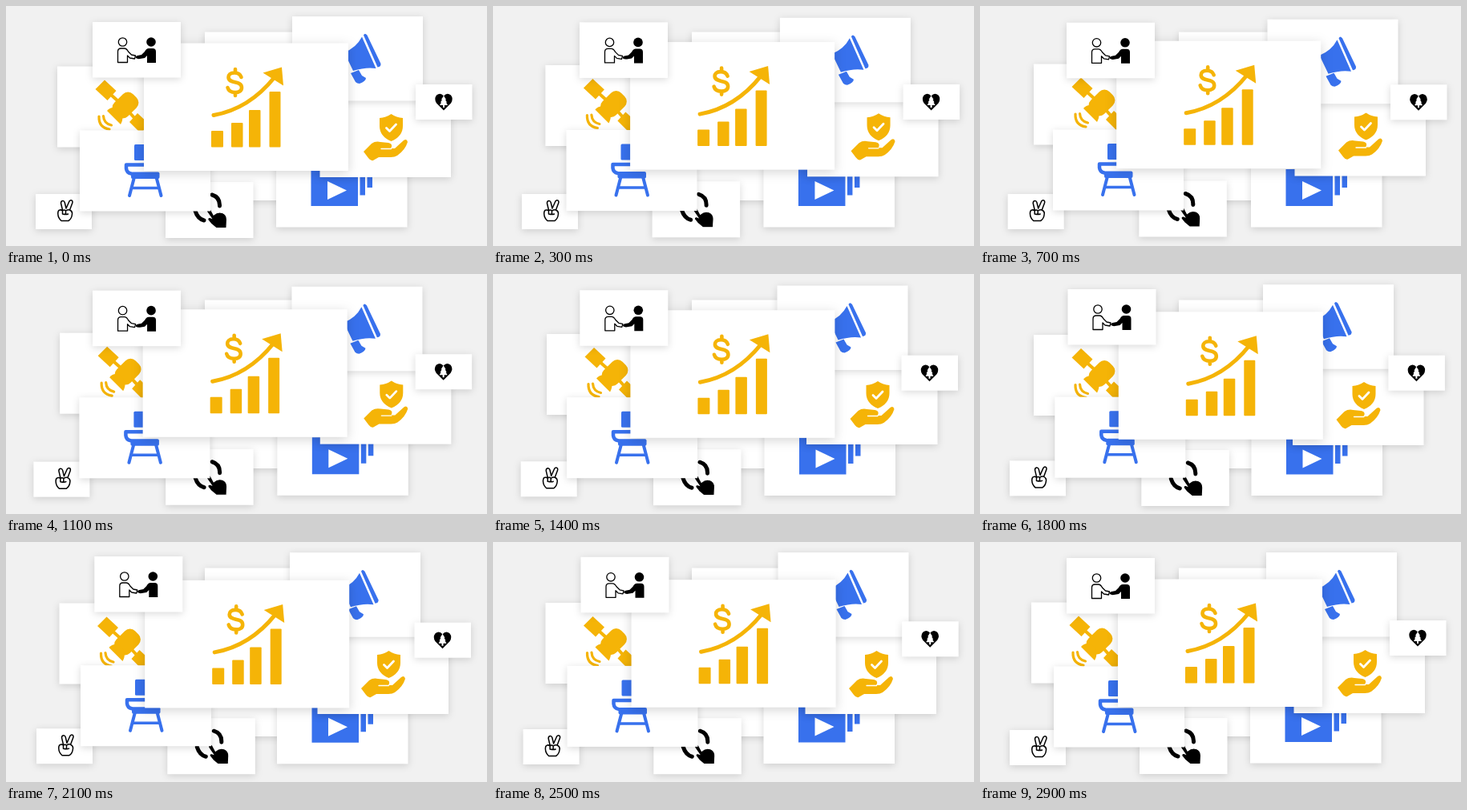
Animation, 600 px wide and 300 px high, one loop 3000 ms. Source, as an HTML page:

```html
<!DOCTYPE html>
<html lang="en">
<head>
<meta charset="utf-8">
<title>Floating cards</title>
<style>
  html, body { margin: 0; width: 100%; height: 100%; overflow: hidden; background: #f1f1f1; }
  svg { display: block; width: 100vw; height: 100vh; }
  .card { fill: #fff; filter: drop-shadow(0 2px 5px rgba(0, 0, 0, .15)); }
  .big { filter: drop-shadow(0 3px 7px rgba(0, 0, 0, .17)); }
  .gold { fill: #f5b407; }
  .blue { fill: #3871ed; }
  .line { fill: none; stroke-linecap: round; stroke-linejoin: round; }
  .gold.line { fill: none; stroke: #f5b407; }
  .blue.line { fill: none; stroke: #3871ed; }
  .ink.line { stroke: #000; }
  .white { fill: #fff; }
  .white.line { fill: none; stroke: #fff; }
</style>
</head>
<body>
<svg viewBox="0 0 600 300" xmlns="http://www.w3.org/2000/svg">
  <rect class="card" x="248" y="32.5" width="150" height="210.5"/>

  <g id="video">
    <rect class="card" x="337" y="171" width="163.5" height="105.5"/>
    <path class="blue" d="M380.5 204h58.5v46h-58.5zM441.500 204h6.500v32.500h-6.500zM450.500 204h6.500v23h-6.500z"/>
    <path class="white" d="M401 219L425 230.500L401 242z"/>
  </g>

  <g id="shield">
    <rect class="card" x="391.500" y="109" width="163.500" height="105"/>
    <path class="gold" d="M480.500 135Q487 139.500 495 140V150Q495 163 480.500 169Q466 163 466 150V140Q474 139.500 480.500 135z"/>
    <path class="white line" stroke-width="2.800" d="M474.500 152.500L478.500 156.500L486.500 148"/>
    <path class="gold" d="M446 182L456 172Q461 168.500 467 170L477 171Q482 172 481 176L480 178L485 178L496 168Q500 165 501 170Q498 180 488 187Q485 189 480 189H465L458 193Q455 194 452 190z"/>
    <path class="white line" stroke-width="1.300" d="M468 178.500H480.500"/>
  </g>

  <g id="satellite">
    <rect class="card" x="64" y="75.500" width="163" height="101"/>
    <path class="gold" d="M123 92.500L137.500 106L126.500 118L111.500 104zM164 134L179 148L168 159L154 145z"/>
    <path class="gold line" stroke-width="4" d="M131 111L141 120M154 133L162 142"/>
    <rect class="gold" x="132.500" y="112" width="33" height="24" rx="9" transform="rotate(-45 149 124)"/>
    <path class="gold" d="M126 131Q132 124 140 129Q149 137 143 148z"/>
    <path class="gold line" stroke-width="3.200" d="M121.500 137.500Q122 147 131.500 149M116 138Q115.500 152 129 154"/>
  </g>

  <g id="touch">
    <rect class="card" x="199" y="220" width="109.500" height="70"/>
    <path class="ink line" stroke-width="5" d="M257 236Q267 239 266.500 250M236 256Q239 266 247 268"/>
    <path stroke="#fff" stroke-width="1.200" d="M250.500 257Q249.500 253 252.500 252.500Q254.500 252.500 255.500 254.500L259 261Q264 256.500 270 258.500Q276 261 275.500 268L275 277.500H262L256 272.500L252 267.500Q251 264 254.500 264.500L256 265z"/>
  </g>

  <g id="peace">
    <rect class="card" x="37" y="235" width="70" height="44"/>
    <path class="ink line" stroke-width="1.500" d="M70.500 255L68.500 246.500Q68.500 243.500 71 243.500Q72.500 243.500 73.200 245.500L75 253L79 244Q80.500 242 82.300 243.200Q83.500 244.500 82.700 246.500L79.500 255Q83 256.500 82.500 260Q82 266 78 268.500H69Q65 265 64.800 260Q64.500 255.500 67 255Q69 254.500 70.500 256V260M70.500 256q2-2 4 0v4M74.500 256q3-2 5-1M70.500 260q5 1 7 0"/>
  </g>

  <g id="chair">
    <rect class="card" x="92" y="155.500" width="163" height="101"/>
    <rect class="blue" x="160" y="173" width="28" height="20" rx="1.500"/>
    <path class="blue line" stroke-width="4.500" d="M172 198.500H150V203Q150.500 208.500 156 209.500"/>
    <rect class="blue" x="156" y="207.500" width="35.500" height="8.500" rx="2"/>
    <path class="blue line" stroke-width="4" d="M160 214L154 237M187.500 214L193.500 237"/>
    <path class="blue line" stroke-width="3.500" d="M158 227.500H190"/>
  </g>

  <g id="horn">
    <rect class="card" x="357" y="13" width="163" height="105.500"/>
    <path class="blue" d="M446 36.500Q447.500 33 450.500 36.500L467.500 72Q468 76 463.500 76.500z"/>
    <path class="blue" d="M444 38.500L461.500 78Q449 76 433 81L422 58Q437 52 444 38.500z"/>
    <path class="blue" d="M430 84L440 80L444 87L449 90Q449 94 441 97Q438 97 436 95z"/>
  </g>

  <g id="heart">
    <rect class="card" x="511" y="98" width="70.500" height="44"/>
    <path d="M546 130.500L537 121.500Q533.500 116 537 111.500Q542 107.500 546 112.500Q550 107.500 555 111.500Q558.500 116 555 121.500z"/>
    <path class="white" d="M546 112L549 117H548L550 120.500H549L551 124H547V127H545V124H541L543 120.500H542L544 117H543z"/>
  </g>

  <g id="chart">
    <rect class="card big" x="172" y="46.500" width="255" height="159.500"/>
    <rect class="gold" x="256" y="156" width="15" height="20.500" rx="1"/>
    <rect class="gold" x="281" y="146" width="14.500" height="30.500" rx="1"/>
    <rect class="gold" x="303" y="130" width="14.500" height="46.500" rx="1"/>
    <rect class="gold" x="328.500" y="107" width="14" height="69.500" rx="1"/>
    <path class="gold line" stroke-width="5" d="M259 136.500C290 131 315 114 335 89"/>
    <path class="gold" d="M344 76.500L346 99.500L320.500 83.500z"/>
    <path class="gold line" stroke-width="4.600" d="M293.500 89C292 84.500 288.500 83.500 285 83.500C279.500 83.500 277.500 86.500 277.500 89C277.500 98 294 92.500 294 102C294 106 290.500 108 286 108C281 108 277.500 106 276.500 102M286 79V83M286 108V112"/>
  </g>

  <g id="deal">
    <rect class="card" x="108" y="20" width="110" height="69.500"/>
    <circle class="ink line" cx="145.500" cy="45" r="5.200" stroke-width="1.300"/>
    <path class="ink line" stroke-width="1.300" d="M139.500 70.500v-13.500q0-4 4-4h4q3 0 5 4l4 4 5 1-1 4-6-1-3-3v8.500z"/>
    <circle cx="181" cy="45" r="5.800"/>
    <path d="M187 71V57q0-4-4-4h-5q-3 0-5 4l-4 4-5 1q-3 1-2 3 2 1.500 5 1l6-1 3-3v9z"/>
  </g>
</svg>
<script>
const LOOP = 3000, STEP = 100;
const times = [0, 700, 1400, 1800, 2100, 2500, 2900];

// Drift from the rest pose at the five inner times; the ends are at rest.
const drift = {
  video:     [[1, 1.5, 1.5, 1, .5],        [0, .5, .5, .8, .5]],
  shield:    [[1, -.5, -1.5, -3, -2],      [-1.5, -1, 0, 1, 1]],
  satellite: [[3, 3, 3, 2.5, 1.5],         [-3, -.5, .5, 1, .5]],
  touch:     [[-.7, 1, 2.3, 2.3, 1.3],     [-1.5, -.8, 0, .2, .2]],
  peace:     [[-2.3, -2.3, 0, 1, .6],      [0, -.7, -1.6, -1.8, -1]],
  chair:     [[-1, 0, 1.3, 1, .5],         [-1, -1.3, -1.8, -1.3, -.6]],
  horn:      [[1.5, -2.5, -4, -3, -1.5],   [3.7, 1.5, .2, .2, .1]],
  heart:     [[1, -1.5, -1.6, -1.5, -.8],  [.3, 3.7, 3.7, 2.7, 1.3]],
  chart:     [[-1.8, -.6, .8, 1.2, .6],    [-2.8, -1.2, .8, 1.4, .7]],
  deal:      [[0, .3, 1.5, 2.3, 1.5],      [.8, .3, -1, -2, -1.2]]
};

// Smooth closed curve through the given values.
function curve(inner, t) {
  const v = [0, ...inner, 0], n = v.length;
  const time = i => times[(i + n) % n] + LOOP * Math.floor(i / n);
  const val = i => v[(i + n) % n];
  const slope = i => (val(i + 1) - val(i - 1)) / (time(i + 1) - time(i - 1));
  let i = n - 1;
  while (times[i] > t) i--;
  const h = time(i + 1) - time(i), u = (t - time(i)) / h, w = 1 - u;
  return val(i) * (1 + 2 * u) * w * w + val(i + 1) * u * u * (3 - 2 * u)
    + h * u * w * (slope(i) * w - slope(i + 1) * u);
}

function draw(ms) {
  const t = Math.floor(ms % LOOP / STEP) * STEP;
  for (const [id, [x, y]] of Object.entries(drift)) {
    document.getElementById(id).setAttribute('transform',
      `translate(${curve(x, t).toFixed(2)} ${curve(y, t).toFixed(2)})`);
  }
}

const start = performance.now();
function tick() {
  draw(performance.now() - start);
  requestAnimationFrame(tick);
}
tick();
</script>
</body>
</html>
```
